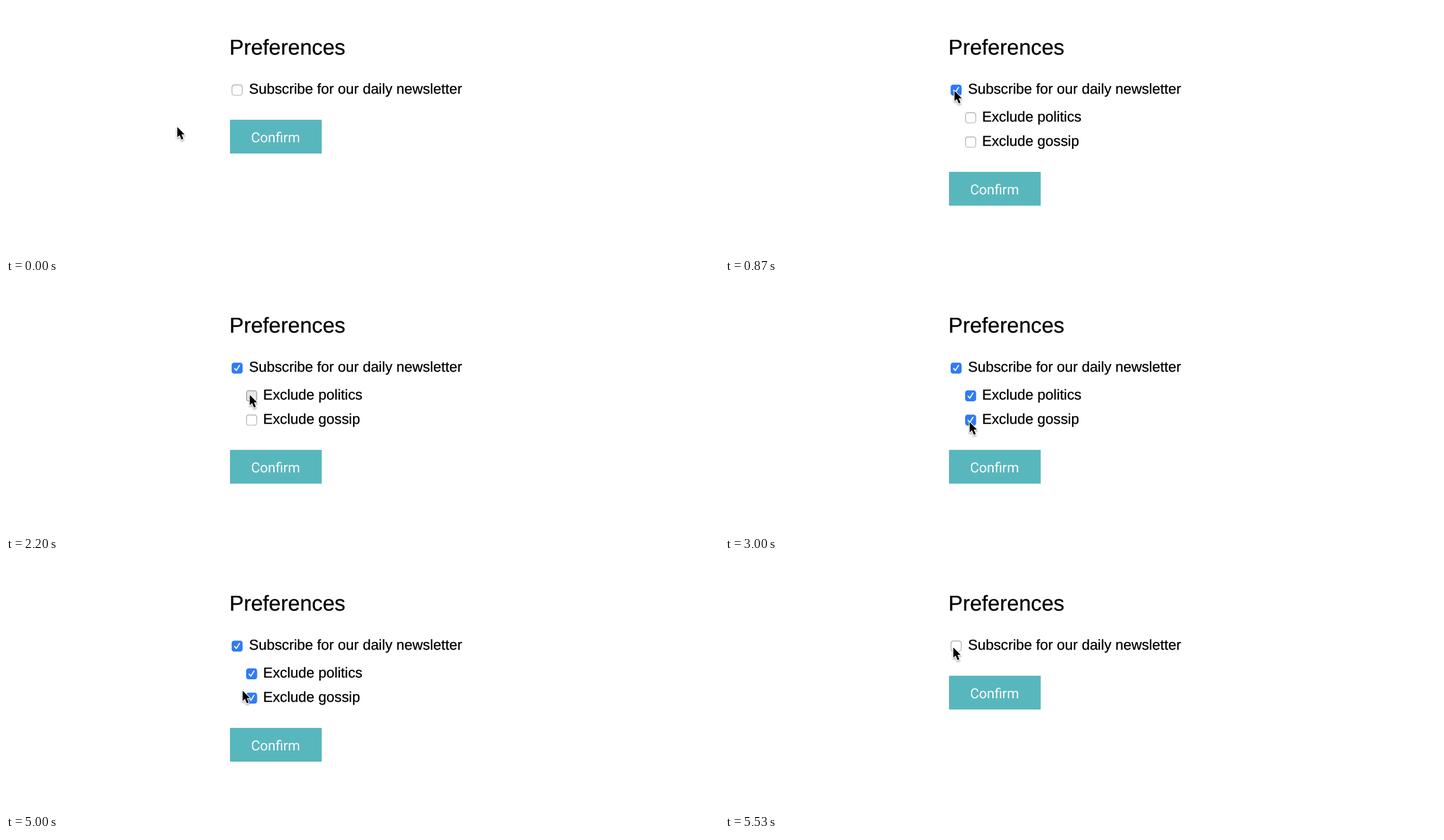
Animation of 1200x422 px, one loop 6.27 s. Source, as an HTML page:

```html
<!DOCTYPE html>
<html lang="en">
<head>
<meta charset="utf-8">
<title>Preferences</title>
<style>
  html, body { margin: 0; width: 100%; height: 100%; overflow: hidden; background: #fff; }
  svg { display: block; width: 1200px; height: 422px; }
  text {
    font: 24.25px "Liberation Sans", Arial, sans-serif; text-rendering: geometricPrecision;
    stroke: #000; stroke-width: .3;
  }
  .title { font-size: 36.2px; }
  .button { fill: #58b7bd; }
  .label { font: 23.3px Roboto, sans-serif; fill: #fff; stroke: none; }
  .box rect { fill: #fff; stroke: url(#edge); stroke-width: 1.3; }
  .box path { fill: none; stroke: #fff; stroke-width: 1.9; stroke-linecap: round; stroke-linejoin: round; visibility: hidden; }
  .box.pressed rect { fill: url(#press); stroke: #979797; }
  .box.on rect { fill: #307bf6; stroke: #307bf6; }
  .box.on.pressed rect { fill: #1f5fd3; stroke: #1f5fd3; }
  .box.on path { visibility: inherit; }
  #cursor { filter: drop-shadow(0 2px 1.6px rgba(0, 0, 0, .35)); }
  #cursor path { fill: #000; stroke: #fff; stroke-width: 2.4; paint-order: stroke; stroke-linejoin: round; }
</style>
</head>
<body>
<svg viewBox="0 0 1200 422">
  <defs>
    <linearGradient id="edge" x2="0" y2="1">
      <stop stop-color="#a2a2a2"/><stop offset="1" stop-color="#bebebe"/>
    </linearGradient>
    <linearGradient id="press" x2="0" y2="1">
      <stop stop-color="#e2e2e2"/><stop offset="1" stop-color="#f1f1f1"/>
    </linearGradient>
    <g id="parts">
      <rect x="-8.6" y="-8.6" width="17.2" height="17.2" rx="3.6"/>
      <path d="M-4.2 .6L-1.4 4L4 -4.6"/>
    </g>
  </defs>

  <text class="title" x="376" y="81.5">Preferences</text>
  <g class="box" transform="translate(389 142)"></g>
  <text x="409" y="148">Subscribe for our daily newsletter</text>

  <g id="options">
    <g class="box" transform="translate(413.4 188.7)"></g>
    <text x="432.8" y="195">Exclude politics</text>
    <g class="box" transform="translate(413.4 229.7)"></g>
    <text x="432.8" y="236">Exclude gossip</text>
  </g>

  <g id="confirm">
    <rect class="button" x="377" y="192" width="154.4" height="57"/>
    <text class="label" x="412.4" y="230">Confirm</text>
  </g>

  <g id="cursor"><path d="M.3 .3V17.6L4.2 14L7.4 21.6L10.5 20.3L7.3 12.8H12.6Z"/></g>
</svg>
<script>
const LOOP = 6270, TICKS_PER_MS = 0.015;
const $ = id => document.getElementById(id);
const boxes = [...document.querySelectorAll('.box')];
const parts = $('parts').innerHTML;
boxes.forEach(box => { box.innerHTML = parts; });

const smooth = u => u * u * (3 - 2 * u);
const slowDown = u => 1 - (1 - u) ** 2;

// Pointer stops: tick, x, y, easing towards the stop
const stops = [
  [5, 288, 204], [12, 386, 143], [25, 386, 143], [26, 386, 147],
  [33, 410, 187], [35, 410, 187], [42, 411.5, 233], [45, 411.5, 233],
  [52, 412, 254], [74, 412, 254], [75, 398, 217], [80, 384, 144, slowDown]
];

function pointer(tick) {
  const i = stops.findIndex(stop => stop[0] >= tick);
  if (i < 1) return (i ? stops[stops.length - 1] : stops[0]).slice(1, 3);
  const [t0, x0, y0] = stops[i - 1], [t1, x1, y1, ease = smooth] = stops[i];
  const u = ease((tick - t0) / (t1 - t0));
  return [x0 + (x1 - x0) * u, y0 + (y1 - y0) * u];
}

function setBox(i, on, pressed) {
  boxes[i].classList.toggle('on', on);
  boxes[i].classList.toggle('pressed', pressed);
}

function draw(now) {
  // The screen updates 15 times a second
  const tick = Math.floor((now % LOOP + 5) * TICKS_PER_MS);
  const open = tick >= 13 && tick < 83;
  setBox(0, open, tick === 12 || (tick >= 81 && tick < 83));
  setBox(1, tick >= 34, tick === 33);
  setBox(2, tick >= 45, tick === 43 || tick === 44);
  $('options').setAttribute('visibility', open ? 'visible' : 'hidden');
  $('confirm').setAttribute('transform', `translate(0 ${open ? 88 : 0})`);
  $('cursor').setAttribute('transform', `translate(${pointer(tick)})`);
  requestAnimationFrame(draw);
}
draw(0);
</script>
</body>
</html>
```
